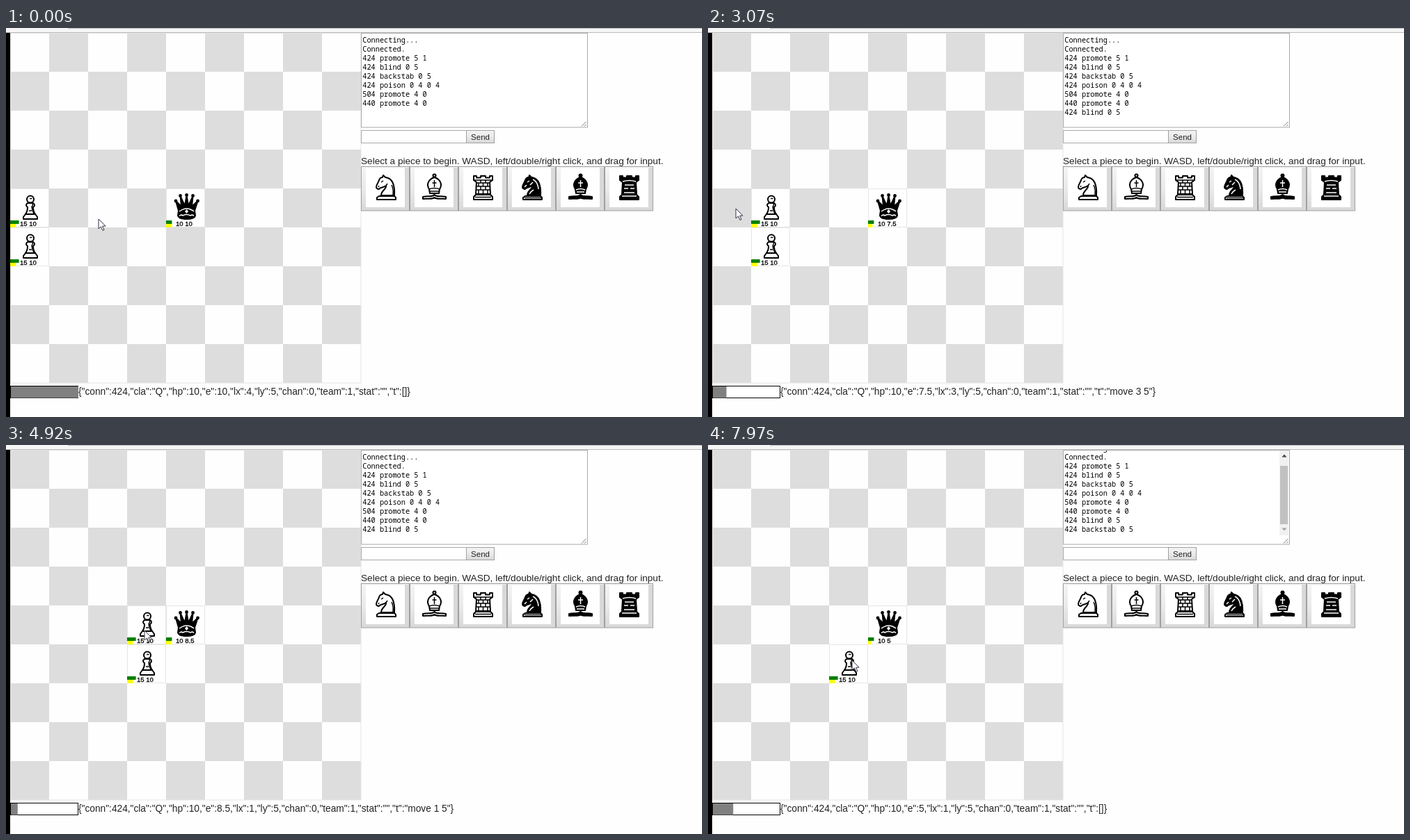
Write an HTML page that moves like this. It is 1000 by 560 pixels and loops after 8000 ms.

```html
<!DOCTYPE html>
<html lang="en">
<head>
<meta charset="utf-8">
<title>Chess arena</title>
<style>
html, body { margin: 0; width: 100%; height: 100%; overflow: hidden; background: #fefefe; }
svg { display: block; width: 1000px; height: 560px; }
text { font-family: "Liberation Sans", Arial, sans-serif; fill: #222; white-space: pre; }
.log text { font: 10.28px "Noto Sans Mono", "DejaVu Sans Mono", monospace; fill: #000; }
.tag { font-size: 9.5px; fill: #000; stroke: #000; stroke-width: .3px; }
.hit { font-size: 9.5px; font-weight: bold; fill: #f00; }
.w, .b { stroke: #000; stroke-width: 2; stroke-linejoin: round; stroke-linecap: round; fill: #fff; }
.b { fill: #000; }
.n { fill: none; stroke: #000; stroke-width: 1.5; }
.v { fill: none; stroke: #fff; stroke-width: 1.5; }
</style>
</head>
<body>
<svg viewBox="0 0 1000 560" xmlns="http://www.w3.org/2000/svg">
  <defs>
    <linearGradient id="face" x2="0" y2="1">
      <stop offset="0" stop-color="#f4f4f4"/><stop offset=".5" stop-color="#eaeaea"/><stop offset="1" stop-color="#d8d8d8"/>
    </linearGradient>
    <clipPath id="logClip"><rect x="511" y="8" width="323" height="134"/></clipPath>

    <path id="horse" d="M22 39C22 32 30 30 29 25C25 28 22 27 20 29C18 31 15 29 15 27C15 23 18 21 19 17C20 14 22 13 24 13L25 10L28 13C37 14 42 22 41 39Z"/>
    <path id="foot" d="M16 45V42L19 40H41L43 42V45Z"/>
    <g id="mitre">
      <circle cx="28.5" cy="10.5" r="2"/>
      <path d="M28.5 13C19 16 17 24 21 30L22 36H35L36 30C40 24 38 16 28.5 13Z"/>
    </g>
    <path id="ribbon" d="M28.5 38C25 42 20 39 12 41V44C20 43 26 45 28.5 42C31 45 37 43 45 44V41C37 39 32 42 28.5 38Z"/>
    <path id="tower" d="M15 11H19V13.5H25V11H32V13.5H38V11H42V17L38 20L39 37H18L19 20L15 17Z"/>
    <path id="plinth" d="M15 45V41L18 38H39L42 41V45Z"/>

    <g id="pawn">
      <g class="w">
        <circle cx="29" cy="15.5" r="5"/>
        <path d="M25 21Q21 24 25 27Q25 33 22 37H36Q33 33 33 27Q37 24 33 21Z"/>
        <path d="M19 44V41L22 37H36L39 41V44Z"/>
      </g>
      <path class="n" d="M28 14.5H31.5M32 22Q33 24 31 26.5Q32 33 34 36M27 32H31"/>
    </g>
    <g id="queen">
      <path class="b" stroke-width="1" d="M18 32L14 18L22 26L20.5 11L27 25L29.5 10L32 25L38.5 11L37 26L45.5 18L41 32L42 39Q41 44 29.5 44Q18 44 17 39Z"/>
      <g><circle cx="14" cy="18" r="2.4"/><circle cx="20.5" cy="10.5" r="2.4"/><circle cx="29.5" cy="9.5" r="2.4"/><circle cx="38.5" cy="10.5" r="2.4"/><circle cx="45.5" cy="18" r="2.4"/></g>
      <path class="v" d="M19 33Q29.5 25 40 33M19 39.5Q22 37 24 39Q29.5 36 35 39Q38 37 40 39.5"/>
      <path fill="#fff" d="M29.5 30L32 33L29.5 36L27 33Z"/>
    </g>
    <g id="knightW">
      <g class="w"><use href="#horse"/><use href="#foot"/></g>
      <path class="n" d="M22 20L25 18M18 27L19 25M29 25L31 22M37 24Q40 30 39 38"/>
    </g>
    <g id="knightB">
      <use class="b" href="#horse"/><use class="w" href="#foot"/>
      <path class="v" d="M22 20L25 18M18 27L21 24M26 24L30 20M30 16Q37 19 38 30M25 37Q27 33 31 31"/>
      <path class="n" d="M18 42.5H42"/>
    </g>
    <g id="bishopW">
      <g class="w"><use href="#mitre"/><use href="#ribbon"/></g>
      <path class="n" d="M28.5 17V27M25.5 21H31.5M21 30Q28.5 27 36 30M22 33H35"/>
    </g>
    <g id="bishopB">
      <g class="b"><use href="#mitre"/><use href="#ribbon"/></g>
      <path class="v" d="M28.5 17V27M25 21H32M22 31Q28.5 28 35 31M23 34H34"/>
    </g>
    <g id="rookW">
      <g class="w"><use href="#tower"/><use href="#plinth"/></g>
      <path class="n" d="M16 17H41M19 21H38M19 26H38M19 31H38M25 17V21M32 17V21M22 21V26M28.5 21V26M35 21V26M25 26V31M32 26V31M22 31V36M28.5 31V36M35 31V36M17 41.5H40"/>
    </g>
    <g id="rookB">
      <g class="b"><use href="#tower"/><use href="#plinth"/></g>
      <path class="v" d="M19 19Q28.5 16 38 19M22 24H35M21 29H27M30 29H36M21 35H36M18 40H39"/>
    </g>
  </defs>

  <rect width="1000" height="560" fill="#fefefe"/>
  <rect width="1000" height="6" fill="#f6f6f6"/>
  <path d="M0 6.5H1000M90.5 0V2M90 .5H1000" stroke="#bbb" fill="none"/>
  <rect y="7" width="6" height="553"/>

  <g id="board"></g>

  <rect x="6.5" y="515.5" width="97" height="17" fill="#fff" stroke="#000"/>
  <rect id="meter" x="7" y="516" height="16.5" fill="#808080"/>
  <text id="state" x="104" y="528" font-size="13.72"></text>

  <rect x="510.5" y="7.5" width="325" height="135.5" fill="#fff" stroke="#a9a9a9"/>
  <g class="log" clip-path="url(#logClip)"><g id="log"></g></g>
  <g id="bar">
    <rect x="821" y="8" width="13" height="122" fill="#f1f1f1"/>
    <rect id="thumb" x="822" width="11" height="84" fill="#c1c1c1"/>
    <path id="up" d="M824.5 17.5L828 13.5L831.5 17.5Z"/>
    <path id="down" d="M824.5 119.5L828 123.5L831.5 119.5Z"/>
  </g>
  <path d="M827 141.5L833.5 135M831 141.5L833.5 139" stroke="#777" fill="none"/>

  <rect x="510.5" y="147.5" width="151" height="18" fill="#fff" stroke="#a9a9a9"/>
  <rect x="661.5" y="147.5" width="40" height="18" fill="url(#face)" stroke="#a0a0a0"/>
  <text x="681.5" y="161" font-size="11.5" text-anchor="middle">Send</text>
  <text x="510" y="196" font-size="13.62">Select a piece to begin. WASD, left/double/right click, and drag for input.</text>
  <g id="picks"></g>

  <path id="cursor" d="M0 0V14L3.4 11L6 16.5L8 15.5L5.6 10.2H10Z" fill="#fff" stroke="#334" stroke-width="1" stroke-linejoin="round"/>
</svg>
<script>
const $ = id => document.getElementById(id);
const LOOP = 8000, STEP = 139.8, TURN = 965, CELL = 56;

// One entry per server tick
const turns = [
  { lx: 4, e: 10 },
  { lx: 4, e: 10 },
  { lx: 4, e: 7, t: "blind 0 5" },
  { lx: 3, e: 7.5, t: "move 3 5" },
  { lx: 2, e: 8, t: "move 2 5" },
  { lx: 1, e: 8.5, t: "move 1 5" },
  { lx: 1, e: 4, t: "backstab 0 5", hurt: 50 },
  { lx: 1, e: 4.5 },
  { lx: 1, e: 5 }
];

const lines = ["Connecting...", "Connected.", "424 promote 5 1", "424 blind 0 5", "424 backstab 0 5",
  "424 poison 0 4 0 4", "504 promote 4 0", "440 promote 4 0", "424 blind 0 5", "424 backstab 0 5"];

// Cursor stops: time, x, y
const path = [[0, 133, 275], [950, 41, 260], [3070, 40, 260], [3300, 40, 260], [3940, 173, 269],
  [4500, 199, 267], [4920, 199, 267], [5800, 200, 261], [6700, 200, 261], [7500, 207, 310], [LOOP, 207, 310]];

const rect = (x, y, w, h, fill, more = "") =>
  `<rect x="${x}" y="${y}" width="${w}" height="${h}" fill="${fill}" ${more}/>`;

function piece(name, col, row, hp, e) {
  const x = 6 + col * CELL, y = 7 + row * CELL;
  return rect(x + .5, y + .5, CELL - 1, CELL - 1, "#fff", 'stroke="#e6e6e6"') +
    `<use href="#${name}" x="${x}" y="${y}"/>` +
    rect(x, y + 46, Math.max(0, hp) * .84, 5, "#008000") +
    rect(x, y + 51, e * .84, 5, "#ff0") +
    `<text class="tag" x="${x + 14}" y="${y + 54}">${hp} ${e}</text>`;
}

function drawBoard(n) {
  const { lx, e, t, hurt = 0 } = turns[n], col = 4 - lx;
  let s = rect(6, 7, 504, 504, "#fefefe");
  for (let r = 0; r < 9; r++)
    for (let c = 0; c < 9; c++)
      if ((c + r + lx) % 2) s += rect(6 + c * CELL, 7 + r * CELL, CELL, CELL, "#ddd");
  s += rect(6.5, 7.5, 503.5, 503.5, "none", 'stroke="#e4e4e4"');
  if (n < 7) s += piece("pawn", col, 4, 15 - hurt, 10);
  s += piece("pawn", col, 5, 15, 10) + piece("queen", 4, 4, 10, e);
  if (t && !t.startsWith("move")) {
    const x = 6 + col * CELL;
    s += rect(x + .5, 231.5, 55.5, 55.5, "none", 'stroke="#f00"') +
      `<path d="M${x + 28} 259.5H258" stroke="#f00"/>`;
    if (hurt) s += `<text class="hit" x="${x + 55}" y="245" text-anchor="end">-${hurt}</text>`;
  }
  $("board").innerHTML = s;
}

function drawPanel(n) {
  const { lx, e, t = [] } = turns[n];
  $("state").textContent = JSON.stringify(
    { conn: 424, cla: "Q", hp: 10, e, lx, ly: 5, chan: 0, team: 1, stat: "", t });
  const count = n < 2 ? 8 : n < 6 ? 9 : 10, end = n > 7;
  $("log").innerHTML = lines.slice(0, count).map((s, i) =>
    `<text x="512.3" y="${20.5 + 13 * (i - end)}">${s}</text>`).join("");
  $("bar").style.display = n < 6 ? "none" : "";
  $("thumb").setAttribute("y", end ? 30 : 22);
  $("up").setAttribute("fill", end ? "#444" : "#a3a3a3");
  $("down").setAttribute("fill", end ? "#a3a3a3" : "#444");
}

function cursorAt(t) {
  const i = path.findIndex(p => p[0] > t);
  const [t0, x0, y0] = path[i - 1], [t1, x1, y1] = path[i];
  const u = (t - t0) / (t1 - t0), k = u * u * (3 - 2 * u);
  return [x0 + (x1 - x0) * k, y0 + (y1 - y0) * k];
}

$("picks").innerHTML = ["knightW", "bishopW", "rookW", "knightB", "bishopB", "rookB"].map((name, i) => {
  const x = 510 + 70 * i;
  return rect(x + .5, 199.5, 69, 63.5, "url(#face)", 'stroke="#a0a0a0"') +
    rect(x + 63, 201, 6, 61, "#d9d9d9") +
    rect(x + 7, 202, 56, 56, "#fff") +
    `<use href="#${name}" x="${x + 7}" y="202"/>`;
}).join("");

let shown = -1;
function update(ms) {
  const t = Math.floor((ms % LOOP + 8) / STEP) * STEP;
  const phase = t / TURN + .08, n = Math.floor(phase);
  if (n !== shown) {
    drawBoard(n);
    drawPanel(n);
    shown = n;
  }
  const tenths = Math.floor((phase - n) * 10) || 10;
  $("meter").setAttribute("width", Math.min(97, tenths * 9.75));
  $("cursor").setAttribute("transform", `translate(${cursorAt(t)})`);
}

const start = performance.now();
function tick() {
  update(performance.now() - start);
  requestAnimationFrame(tick);
}
tick();
</script>
</body>
</html>
```
